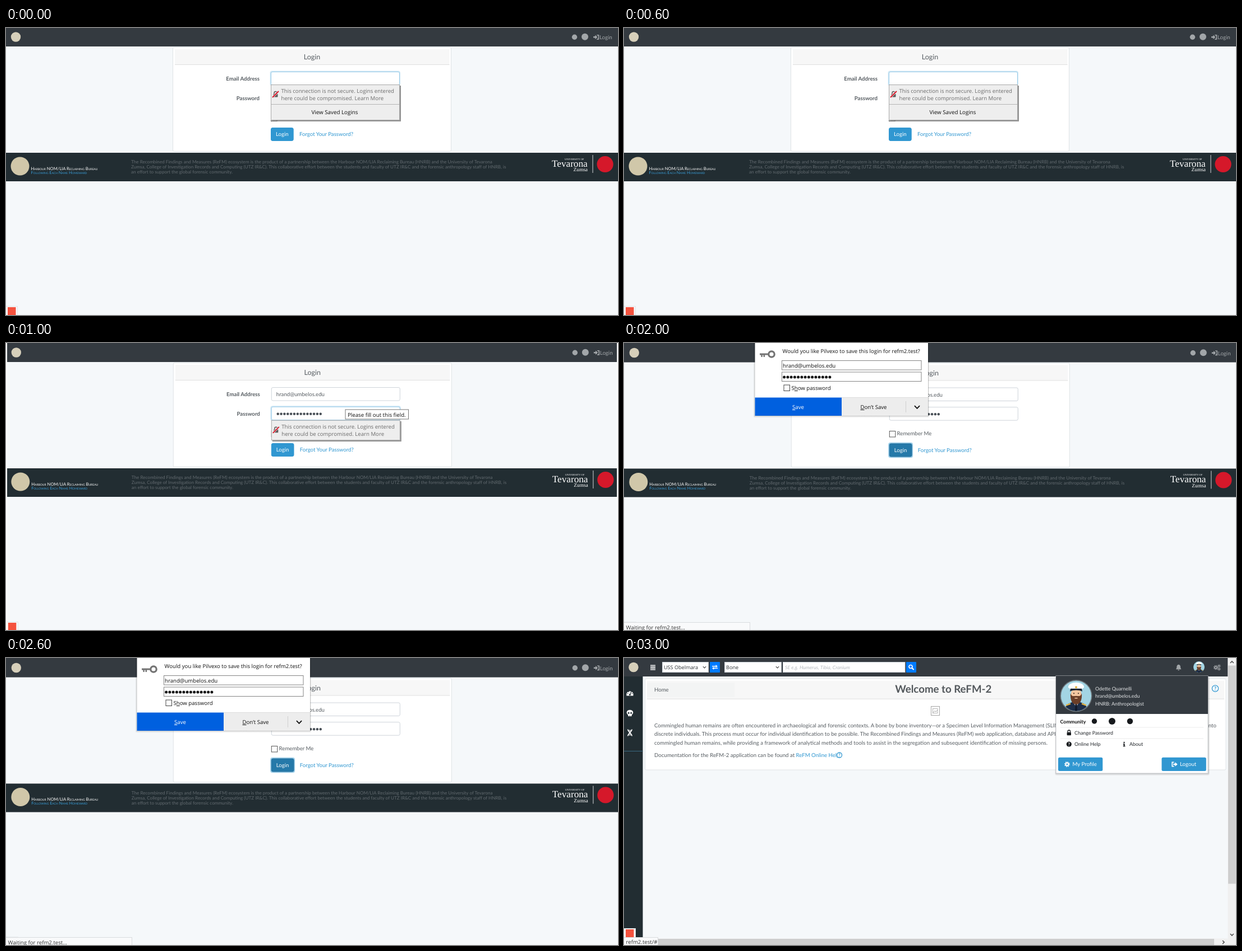
These frames come from a looping animation (1091x513 px, 4000 ms). An HTML page:

```html
<!DOCTYPE html>
<html lang="en">
<head>
<meta charset="utf-8">
<title>Login walkthrough</title>
<style>
html, body { margin: 0; width: 100%; height: 100%; overflow: hidden; background: #fff; }
svg { display: block; width: 1091px; height: 513px; text-rendering: geometricPrecision; }
text { font-family: Lato, sans-serif; font-size: 9.65px; white-space: pre; }
.ui { font-family: "Open Sans", "Noto Sans", sans-serif; }
.serif { font-family: "Liberation Serif", serif; }
.caps { font-variant: small-caps; }
.b { font-weight: 700; }
.i { font-style: italic; }
.u { text-decoration: underline; }
</style>
</head>
<body>
<svg id="stage" viewBox="0 0 1091 513" xmlns="http://www.w3.org/2000/svg"></svg>
<script>
const PAGE = '#f5f8fa', NAV = '#343a40', DARK = '#222d32', BLUE = '#3097d1',
      GREY = '#a2a6a9', INK = '#575d62', RED = '#f4523e';

const box = (x, y, w, h, fill, more = '') =>
  `<rect x="${x}" y="${y}" width="${w}" height="${h}" fill="${fill}" ${more}/>`;
const frame = (x, y, w, h, fill, stroke, rx = 0) =>
  box(x + .5, y + .5, w - 1, h - 1, fill, `stroke="${stroke}" rx="${rx}"`);
const dot = (x, y, r, fill, more = '') =>
  `<circle cx="${x}" cy="${y}" r="${r}" fill="${fill}" ${more}/>`;
const line = (d, stroke, w = 1, more = '') =>
  `<path d="${d}" fill="none" stroke="${stroke}" stroke-width="${w}" ${more}/>`;
const shape = (d, fill) => `<path d="${d}" fill="${fill}"/>`;
const text = (x, y, s, fill = INK, cls = '', size = 9.65, anchor = 'start') =>
  `<text x="${x}" y="${y}" fill="${fill}" class="${cls}" text-anchor="${anchor}" style="font-size:${size}px">${s}</text>`;
const mid = (x, y, s, fill, cls, size) => text(x, y, s, fill, cls, size, 'middle');
const at = (x, y, s, k = 1) => `<g transform="translate(${x} ${y}) scale(${k})">${s}</g>`;
const dots = (x, y, gap, r, fill) =>
  Array.from({length: 14}, (_, i) => dot(x + i * gap, y, r, fill)).join('');
const hot = c => `<tspan class="u">${c}</tspan>`;

const EMAIL = 'hrand@umbelos.edu', HOST = 'refm2.test';

// ---- icons, each centred on 0,0
const padlock = fill => box(-4, -1, 8, 6, fill, 'rx="1"') +
  line('M-2.4 -1V-2.6a2.4 2.4 0 0 1 4.8 0V-1', fill, 1.5);
const badLock = padlock('#5c5c5c') + line('M-5.5 5.5L5.5 -5.5', '#eee', 3.2) +
  line('M-5.5 5.5L5.5 -5.5', '#d7182a', 1.9);
const door = (fill, out) => out
  ? line('M-1 -3.6H-4.2V3.6H-1', fill, 1.6) + shape('M-2.2 -1.2H1V-3.8L5.4 0L1 3.8V1.2H-2.2Z', fill)
  : line('M1 -3.6H4.2V3.6H1', fill, 1.6) + shape('M-5.2 -1.2H-2V-3.8L2.2 0L-2 3.8V1.2H-5.2Z', fill);
const cog = (fill, hole, r = 3.4) => dot(0, 0, r, fill) +
  dot(0, 0, r + .7, 'none', `stroke="${fill}" stroke-width="1.6" stroke-dasharray="${(r + .7) * Math.PI / 8}"`) +
  dot(0, 0, r * .42, hole);
const chevron = (fill, w = 1.3, k = 3) => line(`M${-k} ${-k / 2}L0 ${k / 2}L${k} ${-k / 2}`, fill, w);
const help = r => dot(0, 0, r, '#fff', `stroke="${BLUE}" stroke-width="1.3"`) +
  mid(0, r * .62, '?', BLUE, 'b', r * 1.7);
const swap = shape('M-5 -2.4H1.6V-4.4L5 -1.6L1.6 .6V-.9H-5ZM5 2.6H-1.6V4.6L-5 1.8L-1.6 -.4V1.1H5Z', '#fff');
const lens = dot(-1, -1, 3, 'none', 'stroke="#fff" stroke-width="1.7"') + line('M1.2 1.2L4.6 4.6', '#fff', 2.1);
const bell = shape('M0 -5.2C-3 -4.8 -3.4 -2 -3.4 0C-3.4 1.6 -4.6 2.2 -4.6 3.2H4.6C4.6 2.2 3.4 1.6 3.4 0C3.4 -2 3 -4.8 0 -5.2ZM-1.4 3.9H1.4A1.4 1.4 0 0 1 -1.4 3.9Z', GREY);
const gauge = shape('M-6 4.5A6.3 6.3 0 1 1 6 4.5Z', '#fff') + line('M0 2.4L2.6 -3', DARK, 1.2) +
  dot(0, 2.4, 1.5, DARK) + dot(-3.8, .6, .8, DARK) + dot(-2.2, -2.6, .8, DARK) + dot(4, .6, .8, DARK);
const skull = `<ellipse cx="0" cy="-1" rx="5.8" ry="4.8" fill="#fff"/>` + box(-3.2, 2, 6.4, 3.8, '#fff', 'rx="1"') +
  dot(-2.3, -.3, 1.5, DARK) + dot(2.3, -.3, 1.5, DARK) + line('M0 4V6', DARK, .8);
const helix = line('M-3.6 -6C-3.6 -1 3.6 1 3.6 6M3.6 -6C3.6 -1 -3.6 1 -3.6 6', '#fff', 1.6) +
  line('M-3 -4.2H3M-3 4.2H3M-1.6 -2.2H1.6M-1.6 2.2H1.6', '#fff', 1);
const keyIcon = dot(8, 0, 5.2, 'none', 'stroke="#737373" stroke-width="3.2"') +
  shape('M-13 -1.6H4V1.6H-4V5H-6.4V1.6H-8.2V5H-10.6V1.6H-13Z', '#737373');
const sailor = dot(0, 0, 27, '#a3d5e4') + `<g clip-path="url(#disc)">` +
  shape('M-20 28C-20 15 -13 13 -6 11H6C13 13 20 15 20 28Z', '#1d2d47') +
  shape('M-6 10L0 20L6 10Z', '#fff') + shape('M-1.6 14H1.6L2 27H-2Z', '#10192a') +
  line('M-18 17L-10 14M18 17L10 14', '#e3b341', 2.4) +
  box(-9, -12, 18, 20, '#f3c6a0', 'rx="7"') +
  shape('M-10 -5C-8 2 -5 0 0 0C5 0 8 2 10 -5C11 8 7 15 0 15C-7 15 -11 8 -10 -5Z', '#6a3e28') +
  line('M-2.5 4H2.5', '#f3c6a0', 1.5) + dot(-4, -4.5, 1, '#33241c') + dot(4, -4.5, 1, '#33241c') +
  shape('M-14 -15C-15 -21 -6 -24 0 -24C6 -24 15 -21 14 -15L10 -12H-10Z', '#fff') +
  shape('M-10 -13H10L11 -8C5 -11 -5 -11 -11 -8Z', '#16202f') + dot(0, -15.5, 2, '#e3b341') + '</g>';

// ---- pieces of the login page
const badge = y => frame(-1, y, 22, 18, '#fafbfc', '#dfe3e6') + box(3, y + 2, 14.5, 14, RED);

const footer =
  box(-2, 223, 1095, 51, DARK) + dot(25, 247, 16.5, '#d0c7a9') +
  text(44.5, 253.5, 'Harbour NOM/LIA Reclaiming Bureau', '#fff', 'caps', 7.6) +
  text(44.5, 260.5, 'Following Each Name Homeward', '#3a9fda', 'caps', 7.2) +
  ['The Recombined Findings and Measures (ReFM) ecosystem is the product of a partnership between the Harbour NOM/LIA Reclaiming Bureau (HNRB) and the University of Tevarona',
   'Zumsa, College of Investigation Records and Computing (UTZ IR&amp;C). This collaborative effort between the students and faculty of UTZ IR&amp;C and the forensic anthropology staff of HNRB, is',
   'an effort to support the global forensic community.'
  ].map((s, i) => text(223, 242 + i * 9.1, s, '#626a6f', '', 8.15)).join('') +
  text(996, 235.5, 'UNIVERSITY OF', '#fff', 'serif', 4.6) +
  text(973, 247.5, 'Tevarona', '#fff', 'serif', 17.2) +
  text(1037, 256, 'Zumsa', '#fff', 'serif', 9.4, 'end') +
  box(1045.5, 227, 1, 32, '#d5d8d9') + dot(1068, 243.5, 14.6, '#d5182a');

const field = (y, focus) =>
  (focus ? box(470.5, y - 1.5, 232.5, 27, BLUE, 'opacity=".22" rx="4"') : '') +
  frame(472, y, 230, 24.5, '#fff', focus ? '#98cbe8' : '#ced4da', 2.5);

const loginPage = ({email = '', filled, focus, pressed}) =>
  box(-2, -4, 1095, 520, PAGE) + box(-2, -4, 1095, 37, NAV) +
  dot(17.5, 16, 8.7, '#d6cfba') +
  dot(1013.5, 16.3, 4.7, GREY) + dot(1032, 15.8, 6, GREY) +
  at(1052.2, 16.3, door(GREY)) + text(1058, 20, 'Login', GREY) +
  frame(297, 34, 497, 187, '#fff', '#dfe3e6', 2) +
  box(301, 38, 489.5, 27.5, '#f7f7f7') + box(301, 65, 489.5, 1, '#dfdfdf') +
  mid(545.5, 56, 'Login', INK, '', 12.5) +
  text(452, 94, 'Email Address', INK, 'b', 9.65, 'end') +
  text(452, 128.7, 'Password', INK, 'b', 9.65, 'end') +
  field(78, focus === 0) + field(112.7, focus === 1) +
  text(481, 94, email, INK) + (filled ? dots(483.9, 125.7, 5.85, 2.25, '#495057') : '') +
  frame(472, 155.5, 11.5, 11.5, '#fff', '#555') + text(485.8, 163.5, 'Remember Me') +
  (pressed ? box(470.3, 176.3, 44, 27.4, BLUE, 'opacity=".45" rx="4"') : '') +
  frame(472, 178, 40.7, 24, pressed ? '#2579a9' : BLUE, pressed ? '#226f9b' : BLUE, 2.5) +
  mid(492.3, 193.3, 'Login', '#fff') + text(523, 193.3, 'Forgot Your Password?', BLUE) +
  footer + badge(497);

const warning = (y, h) =>
  box(474, y + 2, 230, h, '#6f6f6f', 'opacity=".75"') + frame(472, y, 230, h, '#eee', '#a8a8a8') +
  at(480.5, y + 17.5, badLock) +
  text(490.5, y + 14.8, 'This connection is not secure. Logins entered', '#6b6b6b', 'ui') +
  text(490.5, y + 28.4, 'here could be compromised. Learn More', '#6b6b6b', 'ui');

const saveDialog =
  box(231, -5, 313, 138, '#000', 'opacity=".07" rx="2"') + box(232.5, -5, 310.5, 136, '#000', 'opacity=".15"') +
  box(233.5, -5, 308.5, 135, '#fff') + at(255, 20, keyIcon) +
  text(282.5, 18, `Would you like Pilvexo to save this login for ${HOST}?`, '#111', 'ui') +
  frame(281, 31, 249.5, 17.5, '#fff', '#858585') + text(283, 43.7, EMAIL, '#111', 'ui') +
  frame(281, 51.5, 249.5, 17.5, '#fff', '#858585') + dots(285.6, 61, 6.25, 2.5, '#111') +
  frame(284.5, 74.5, 11.5, 11.5, '#fff', '#444') +
  text(298.5, 84, `S${hot('h')}ow password`, '#111', 'ui') +
  box(388, 97, 154, 33, '#ededed') + box(388, 97, 154, 1, '#dcdcdc') + box(233.5, 97.5, 154.5, 32.5, '#0060df') +
  mid(310.5, 118, `${hot('S')}ave`, '#fff', 'ui') + mid(445, 118, `${hot('D')}on’t Save`, '#111', 'ui') +
  box(502, 104, 1, 20, '#cfcfcf') + at(522.5, 114.5, chevron('#111', 1.9, 4.6));

const status = (w, y, s) => frame(-1, 499, w + 1, 16, '#f9fafb', '#d9dcde') + text(3.5, y, s, '#333', 'ui');

// ---- the page after login
const select = (x, w, s) => frame(x, 7, w, 19, '#fff', '#ced4da') +
  text(x + 3, 19.8, s, '#2f3438', 'ui', 9.1) + at(x + w - 7.5, 16.5, chevron('#444', 1.1, 2.7));
const blueBtn = (x, icon) => box(x, 7, 18, 19, '#007bff', 'rx="1"') + at(x + 9, 16.5, icon);

const topBar = box(0, 0, 1076.5, 33, NAV) + dot(17, 16.5, 8.7, '#d6cfba') +
  line('M47 13.2H56M47 15.7H56M47 18.2H56M47 20.7H56', '#fff', 1.4) +
  select(68, 83, 'USS Obelmara') + blueBtn(153, swap) + select(179, 102, 'Bone') +
  frame(283, 7, 218.5, 19, '#fff', '#ced4da') +
  text(287, 19.7, 'SE e.g. Humerus, Tibia, Cranium', '#b4b9be', 'i', 8.8) + blueBtn(503, lens) +
  at(988.7, 17, bell) + at(1025, 16, sailor, 10 / 27) +
  at(1055, 17, cog(GREY, NAV, 2.7)) + at(1060.8, 14.3, cog(GREY, NAV, 1.3)) + at(1060.8, 19.8, cog(GREY, NAV, 1.3));

const sideBar = box(0, 33, 33.5, 480, DARK) + at(10.5, 63, gauge) + at(10.5, 98.5, skull) +
  at(10.5, 133.5, helix) + box(0, 166, 33.5, 1, '#3a6983');

const article = frame(37, 36.5, 1036.5, 164, '#fff', '#dfe3e6', 2) +
  box(41, 40.5, 1029, 32.5, '#f7f7f7') + box(41, 72.7, 1029, 1, '#dfdfdf') +
  box(41, 44, 156, 26, '#f3f4f4') + text(54, 60, 'Home') +
  mid(569.3, 62.3, 'Welcome to ReFM-2', '#53585c', 'b', 18.7) + at(1054, 54.5, help(5.6)) +
  frame(547, 86, 16, 17, '#fff', '#a6a6a6') + frame(550, 90, 9.5, 9, '#fff', '#b5b5b5') +
  line('M551 97.5L554 94.5L556 96L559 93', '#a0a0a0') +
  text(54, 124, 'Commingled human remains are often encountered in archaeological and forensic contexts. A bone by bone inventory—or a Specimen Level Information Management (SLIM)') +
  text(1056, 124, 'into', INK, '', 9.65, 'end') +
  text(54, 139.3, 'discrete individuals. This process must occur for individual identification to be possible. The Recombined Findings and Measures (ReFM) web application, database and APIs are') +
  text(54, 154.7, 'commingled human remains, while providing a framework of analytical methods and tools to assist in the segregation and subsequent identification of missing persons.') +
  text(54, 177, `Documentation for the ReFM-2 application can be found at <tspan fill="${BLUE}">ReFM Online Help</tspan>`) +
  at(384, 173.5, help(4.5));

const button = (x, s, tx, icon) => box(x, 177.7, 79.3, 24.4, BLUE, 'rx="2.5"') +
  at(x + (tx - x) - 9.6, 190, icon) + text(tx, 193.4, s, '#fff');
const item = (x, y, s) => text(x, y, s, '#212529', '', 8.9);

const menu = box(768, 33, 276, 177, '#000', 'opacity=".06" rx="4"') + box(769, 33, 274, 175, '#000', 'opacity=".12" rx="2"') +
  frame(769.5, 31.5, 272, 175, '#fff', '#c9cccf') + box(770, 32, 271, 68, NAV) +
  dot(806, 67.7, 28.6, '#6d7479') + at(806, 67.7, sailor) +
  ['Odette Quarnelli', EMAIL, 'HNRB: Anthropologist'].map((s, i) =>
    text(840, 57.5 + i * 13.6, s, '#e3e5e6', '', 8.9)).join('') +
  text(777.5, 116.7, 'Community', '#111', 'b', 8.9) +
  dot(838.5, 113, 4.7, '#16191c') + dot(870, 113, 6, '#16191c') + dot(902, 113, 5.2, '#16191c') +
  [123.5, 143.5].map(y => box(778, y, 255, 1, '#ececec')).join('') +
  at(793.3, 133.6, padlock('#16191c'), .92) + item(803, 137.2, 'Change Password') +
  dot(793.3, 154, 4.6, '#16191c') + mid(793.3, 156.8, '?', '#fff', 'b', 7.8) + item(803, 157.2, 'Online Help') +
  dot(891.6, 150.9, 1.2, '#16191c') + shape('M889.8 153H892.6V157H893.5V158.3H889.8V157H890.6V154.2H889.8Z', '#16191c') +
  item(901, 157.2, 'About') +
  button(774, 'My Profile', 799.5, cog('#fff', BLUE)) + button(958.5, 'Logout', 991, door('#fff', true));

const scrollBars = box(33.5, 501.5, 1043, 12, '#f0f0f0') + box(50, 502, 1002, 11, '#cdcdcd') +
  at(1068.5, 508, `<g transform="rotate(-90)">${chevron('#505050', 1.6)}</g>`) +
  box(1076.5, 0, 15, 513, '#f0f0f0') + box(1077, 13.5, 13.5, 390, '#cdcdcd') +
  at(1083.8, 7.5, `<g transform="rotate(180)">${chevron('#505050', 1.6)}</g>`) +
  at(1083.8, 494.5, chevron('#505050', 1.6));

const scenes = [
  loginPage({focus: 0}) + warning(101, 64) + box(473, 136, 228, 1, '#b5b5b5') +
    mid(586, 154.3, 'View Saved Logins', '#111', 'ui', 9.8),

  `<g clip-path="url(#inset)">` +
    at(.8, 1, loginPage({email: EMAIL, filled: true, focus: 1}) + warning(136.8, 36.3)) + '</g>' +
    frame(604.5, 118.5, 113.5, 18, '#fff', '#777') +
    text(609, 131.5, 'Please fill out this field.', '#111', 'ui', 9.7),

  at(.8, 1.5, loginPage({email: EMAIL, filled: true, pressed: true})) + saveDialog +
    status(225, 511.7, `Waiting for ${HOST}...`),

  box(0, 0, 1091, 513, PAGE) + article + topBar + sideBar + scrollBars + badge(483) + menu +
    status(61, 510.5, `${HOST}/#`)
];

const HOLD = 1000, LOOP = HOLD * scenes.length;
const stage = document.getElementById('stage');
stage.innerHTML =
  `<defs><clipPath id="disc"><circle r="27"/></clipPath>
   <clipPath id="inset"><rect x="2" width="1087" height="513"/></clipPath></defs>` +
  scenes.map(s => `<g class="scene">${box(0, 0, 1091, 513, '#fff')}${s}</g>`).join('');

stage.querySelectorAll('.scene').forEach((g, i) => g.animate([
  {opacity: 1, offset: 0, easing: 'steps(1, end)'},
  {opacity: 0, offset: HOLD / LOOP, easing: 'steps(1, end)'},
  {opacity: 0, offset: 1}
], {duration: LOOP, iterations: Infinity, delay: i ? i * HOLD - LOOP : 0}));
</script>
</body>
</html>
```
